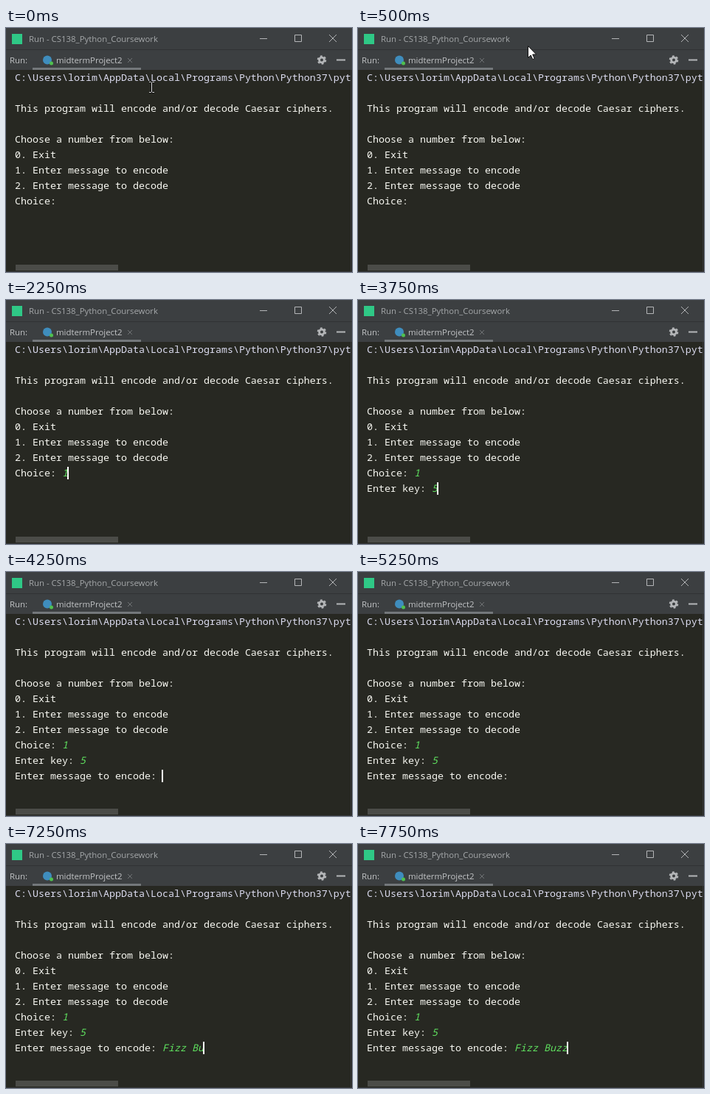
Write an HTML page that moves like this. It is 469 px wide and 332 px high and loops after 8000 ms.

```html
<!DOCTYPE html>
<html lang="en">
<head>
<meta charset="utf-8">
<title>Caesar cipher console</title>
<style>
  html, body { margin: 0; width: 469px; height: 332px; overflow: hidden; background: #272822; }
  svg { display: block; }
  .ui { font: 11.4px "Open Sans", sans-serif; fill: #c3c5c7; }
  .console { font: 13.333px "Noto Sans Mono", monospace; fill: #f8f8f2; white-space: pre; }
  .console .path { fill: #dcdcf0; }
  .console .input { fill: #5fe05f; font-style: italic; }
  .line { fill: none; stroke: #b4b6b8; }
</style>
</head>
<body>
<svg width="469" height="332" viewBox="0 0 469 332">
  <rect width="469" height="57" fill="#3c3f41"/>
  <path d="M0 29.5H469" stroke="#303234"/>
  <path d="M467.5 57V332M0 331.5H469" stroke="#35373a"/>

  <rect x="8" y="8" width="14" height="14" fill="#2fc886"/>
  <text class="ui" x="31" y="19" style="fill:#a5a8aa">Run - CS138_Python_Coursework</text>
  <path class="line" d="M344 14.5h10M391.5 9.5h9v9h-9zM438 9l10 10m0-10l-10 10"/>

  <text class="ui" x="5" y="48">Run:</text>
  <circle cx="56" cy="43.5" r="6" fill="#3f8dbd"/>
  <circle cx="61.5" cy="48" r="2.5" fill="#4fc04f"/>
  <text class="ui" x="68" y="48">midtermProject2</text>
  <path class="line" d="M165 41l6 6m0-6l-6 6" style="stroke:#707375"/>
  <rect x="36" y="54" width="147" height="3" fill="#74787b"/>
  <circle class="line" cx="428" cy="43.5" r="5.3" stroke-width="2" stroke-dasharray="2.775"/>
  <circle class="line" cx="428" cy="43.5" r="3.4" stroke-width="2.8"/>
  <path class="line" d="M448 43.5h12" stroke-width="2"/>

  <g class="console" id="console"></g>
  <rect id="caret" width="2" height="17" fill="#fff"/>
  <rect x="13" y="322" width="139" height="8" fill="#4b4c48"/>

  <g id="beam" fill="none">
    <path d="M194 73.5h2.5l1 1l1-1h2.5M197.5 74v13M194 87.5h2.5l1-1l1 1h2.5" stroke="#111" stroke-width="2.4"/>
    <path d="M194 73.5h2.5l1 1l1-1h2.5M197.5 74v13M194 87.5h2.5l1-1l1 1h2.5" stroke="#ddd"/>
  </g>
  <path id="arrow" d="M.5 .5V16.5L4.2 13L6.8 18.7L9.2 17.6L6.7 12H11.6Z" fill="#fff" stroke="#111"/>
</svg>
<script>
const LOOP = 8000, LEFT = 12, CHAR = 8, TOP = 72, ROW = 21;
const byId = id => document.getElementById(id);
const caret = byId("caret"), arrow = byId("arrow"), beam = byId("beam");

function addRow(row, text, type = "") {
  const node = document.createElementNS("http://www.w3.org/2000/svg", "text");
  node.setAttribute("x", LEFT);
  node.setAttribute("y", TOP + row * ROW);
  node.innerHTML = `<tspan class="${type}">${text}</tspan><tspan class="input"></tspan>`;
  byId("console").append(node);
  return node;
}

addRow(0, "C:\\Users\\lorim\\AppData\\Local\\Programs\\Python\\Python37\\pyt", "path");
addRow(2, "This program will encode and/or decode Caesar ciphers.");
addRow(4, "Choose a number from below:");
addRow(5, "0. Exit");
addRow(6, "1. Enter message to encode");
addRow(7, "2. Enter message to decode");

// Each key time adds one character of the answer.
const prompts = [
  { row: 8, start: 0, label: "Choice: ", answer: "1", keys: [2250] },
  { row: 9, start: 2750, label: "Enter key: ", answer: "5", keys: [3750] },
  { row: 10, start: 4250, label: "Enter message to encode: ", answer: "Fizz Buzz",
    keys: [5750, 6000, 6000, 6250, 6500, 7000, 7250, 7500, 7750] }
];
for (const p of prompts) p.node = addRow(p.row, p.label);

const caretOff = [[0, 750], [1250, 1750], [5250, 5750]];
const arrowStops = [[250, 227, 28], [500, 230, 24], [750, 234, 18]];
const show = (node, on) => node.setAttribute("visibility", on ? "visible" : "hidden");

function draw(t) {
  for (const p of prompts) {
    show(p.node, t >= p.start);
    if (t < p.start) continue;
    const count = p.keys.filter(k => k <= t).length;
    p.node.lastChild.textContent = p.answer.slice(0, count);
    caret.setAttribute("x", LEFT - 1 + (p.label.length + count) * CHAR);
    caret.setAttribute("y", TOP - 13 + p.row * ROW);
  }
  show(caret, !caretOff.some(([from, to]) => t >= from && t < to));

  show(beam, t < 250);
  const stop = arrowStops.filter(([start]) => start <= t).pop();
  show(arrow, stop && t < 1000);
  if (stop) arrow.setAttribute("transform", `translate(${stop[1]} ${stop[2]})`);
}

function tick() {
  draw(performance.now() % LOOP);
  requestAnimationFrame(tick);
}
tick();
</script>
</body>
</html>
```
